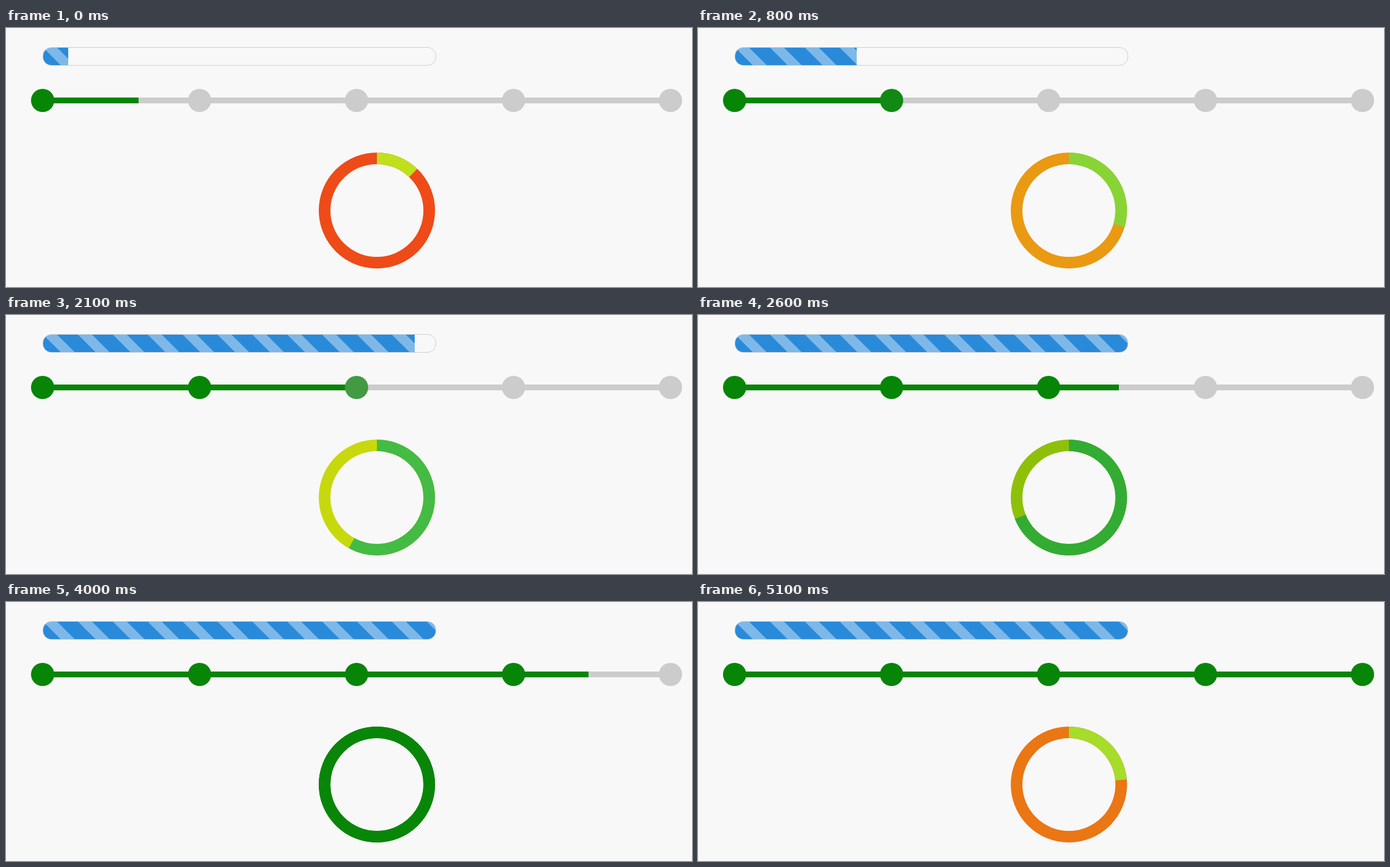
An HTML page for the animation above (5200 ms loop, 1180 by 447 pixels).

```html
<!DOCTYPE html>
<html lang="en">
<head>
<meta charset="utf-8">
<title>Progress indicators</title>
<style>
  html, body { margin: 0; width: 100%; height: 100%; overflow: hidden; background: #f8f8f8; }
  svg { display: block; }
</style>
</head>
<body>
<svg width="1180" height="447" viewBox="0 0 1180 447">
  <defs>
    <pattern id="stripes" x="64" y="34" width="60" height="30" patternUnits="userSpaceOnUse">
      <rect width="60" height="30" fill="#2a8ada"/>
      <path d="M0 0H24L54 30H30Z" fill="#7eb8e8"/>
    </pattern>
    <clipPath id="inner"><rect x="64" y="34" width="675" height="30" rx="14"/></clipPath>
  </defs>
  <rect x="63.5" y="33.5" width="676" height="31" rx="14.5" fill="none" stroke="#ccc"/>
  <g clip-path="url(#inner)"><rect id="bar" x="64" y="34" height="30" fill="url(#stripes)"/></g>
  <rect x="63" y="120" width="1080" height="10" fill="#ccc"/>
  <rect id="line" x="63" y="120" height="10" fill="#078507"/>
  <g id="dots"></g>
  <g fill="none" stroke-width="20" transform="rotate(-90 638 315)">
    <circle id="rest" cx="638" cy="315" r="90"/>
    <circle id="arc" cx="638" cy="315" r="90" pathLength="360"/>
  </g>
</svg>
<script>
const LOOP = 5200, STEP = 100;
const START = 610, TICK = 109.2;   // animation clock at loop start, and per step
const GAP = 270, MOVE = 1000, FADE = 500;
const GREY = [204, 204, 204], GREEN = [7, 133, 7];

const $ = id => document.getElementById(id);
const clamp = v => Math.max(0, Math.min(1, v));
const mix = (a, b, k) => a.map((v, i) => v + (b[i] - v) * k);
const rgb = c => `rgb(${c.map(Math.round)})`;
const hex = s => [0, 2, 4].map(i => parseInt(s.slice(i, i + 2), 16));

// cubic-bezier(.42, 0, 1, 1)
function easeIn(x) {
  if (x <= 0 || x >= 1) return clamp(x);
  let lo = 0, hi = 1;
  for (let i = 0; i < 24; i++) {
    const s = (lo + hi) / 2, q = 1 - s;
    if (1.26 * s * q * q + 3 * s * s * q + s ** 3 < x) lo = s; else hi = s;
  }
  return lo * lo * (3 - 2 * lo);
}

// percent, ring colour, arc colour
const shades = [
  [0, 'f0241a', 'dae40c'],
  [12.2, 'ee4b18', 'c0e01c'],
  [23.6, 'eb7614', 'a6dc2a'],
  [29.5, 'ea9812', '88d436'],
  [45.1, 'e8da10', '66cc48'],
  [57.8, 'c8da0c', '44bb44'],
  [79.9, '56a608', '229e22'],
  [100, '078507', '078507']
].map(([p, a, b]) => [p, hex(a), hex(b)]);

function shade(p, col) {
  let i = 1;
  while (i < shades.length - 1 && shades[i][0] < p) i++;
  const a = shades[i - 1], b = shades[i];
  return rgb(mix(a[col], b[col], (p - a[0]) / (b[0] - a[0])));
}

const dots = Array.from({ length: 5 }, (_, i) => {
  const c = document.createElementNS('http://www.w3.org/2000/svg', 'circle');
  c.setAttribute('cx', 63 + GAP * i);
  c.setAttribute('cy', 125);
  c.setAttribute('r', 20);
  return $('dots').appendChild(c);
});

function draw(ms) {
  const t = START + TICK * Math.floor((ms % LOOP) / STEP);

  $('bar').setAttribute('width', Math.round(675 * easeIn(t / 3000)));

  let len = 0;
  for (let i = 0; i < 4; i++) len += GAP * clamp((t - i * (MOVE + FADE)) / MOVE);
  $('line').setAttribute('width', Math.round(len));

  dots.forEach((dot, i) => {
    const k = i ? easeIn((t - i * (MOVE + FADE) + FADE) / FADE) : 1;
    dot.setAttribute('fill', rgb(mix(GREY, GREEN, k)));
  });

  const p = t / 50 % 100;
  $('rest').setAttribute('stroke', shade(p, 1));
  $('arc').setAttribute('stroke', shade(p, 2));
  $('arc').setAttribute('stroke-dasharray', `${p * 3.6} 400`);
}

const t0 = performance.now();
function frame() {
  draw(performance.now() - t0);
  requestAnimationFrame(frame);
}
frame();
</script>
</body>
</html>
```
